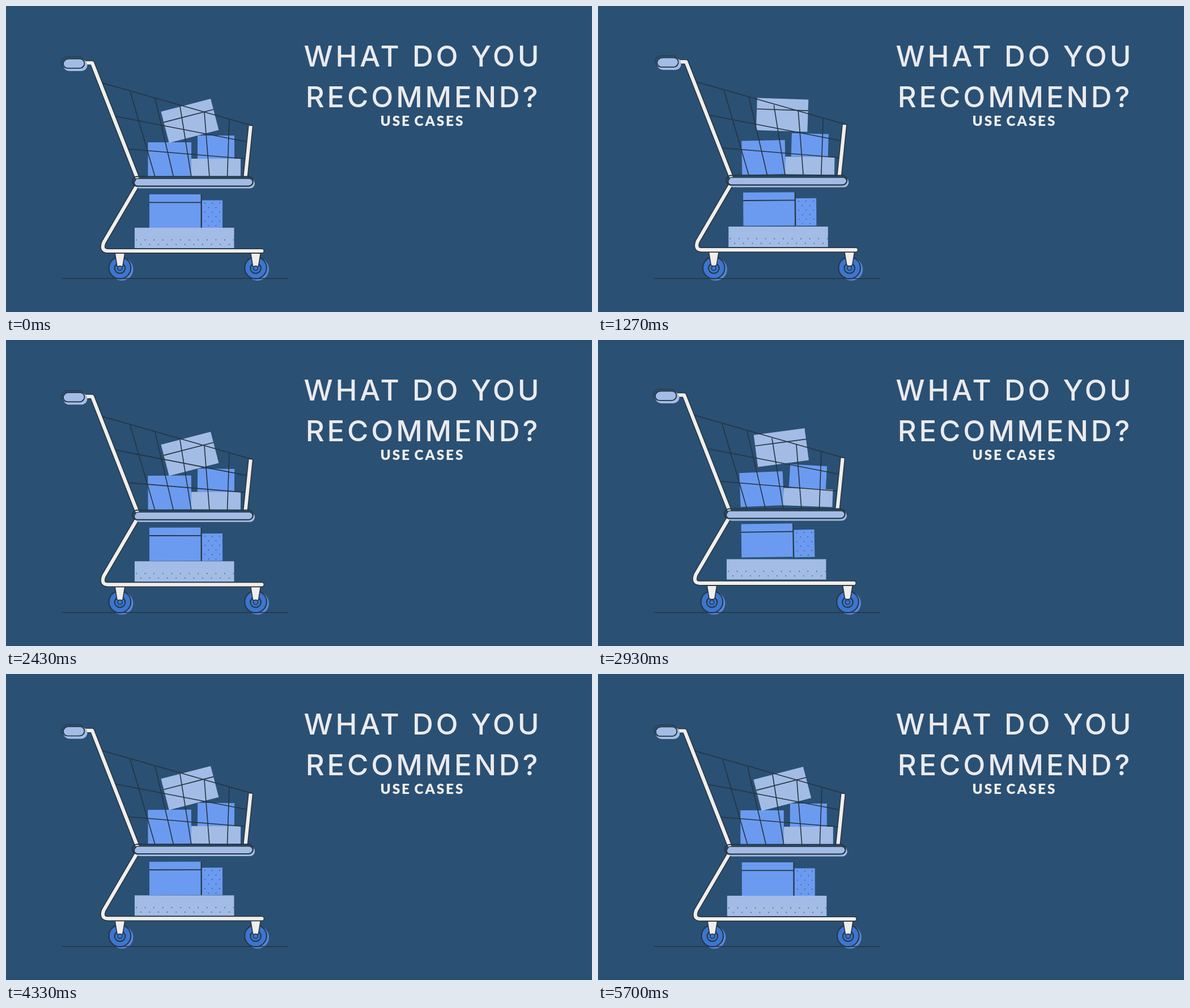
Write an HTML page with a canvas that moves like this. It is 1034 px wide and 541 px high and loops after 5.73 s.

```html
<!DOCTYPE html>
<html lang="en">
<head>
<meta charset="utf-8">
<title>What do you recommend?</title>
<style>
html, body { margin: 0; width: 100%; height: 100%; overflow: hidden; background: #2a5074; }
canvas { display: block; width: 1034px; height: 541px; }
</style>
</head>
<body>
<canvas id="stage" width="1034" height="541"></canvas>
<script>
const ctx = document.getElementById('stage').getContext('2d');
const LOOP = 5730, CYCLE = LOOP / 3;
const BG = '#2a5074', DARK = '#26343f', WHITE = '#f0eeec';
const LIGHT = '#a2bce5', BLUE = '#6b9bf0', WHEEL = '#3b76d0', DOT = '#35568c';

// Half sine between two times, zero elsewhere
const arc = (t, a, b) => t <= a || t >= b ? 0 : Math.sin(Math.PI * (t - a) / (b - a));
const ease = (t, a, b) => {
  const u = Math.min(1, Math.max(0, (t - a) / (b - a)));
  return (1 - Math.cos(Math.PI * u)) / 2;
};

function line(points, color = DARK, width = 1.6) {
  ctx.beginPath();
  points.forEach(([x, y]) => ctx.lineTo(x, y));
  ctx.strokeStyle = color;
  ctx.lineWidth = width;
  ctx.stroke();
}

function tube(path, cap = 'round') {
  ctx.lineCap = cap;
  ctx.lineJoin = 'round';
  for (const [color, width] of [[DARK, 9.2], [WHITE, 6.2]]) {
    ctx.strokeStyle = color;
    ctx.lineWidth = width;
    ctx.stroke(path);
  }
  ctx.lineCap = 'butt';
}

function pill(x, y, w, h, fill, stroke, width) {
  ctx.beginPath();
  ctx.roundRect(x, y, w, h, h / 2);
  if (fill) { ctx.fillStyle = fill; ctx.fill(); }
  if (stroke) { ctx.strokeStyle = stroke; ctx.lineWidth = width; ctx.stroke(); }
}

function disc(x, y, r, fill, width) {
  ctx.beginPath();
  ctx.arc(x, y, r, 0, Math.PI * 2);
  ctx.fillStyle = fill;
  ctx.fill();
  if (width) { ctx.strokeStyle = DARK; ctx.lineWidth = width; ctx.stroke(); }
}

// Box with its own lift and tilt; decor draws in coordinates from its top left corner
function box(x, y, w, h, color, lift, deg, decor) {
  ctx.save();
  ctx.translate(x + w / 2, y + h / 2 - lift);
  ctx.rotate(deg * Math.PI / 180);
  ctx.translate(-w / 2, -h / 2);
  ctx.fillStyle = color;
  ctx.fillRect(0, 0, w, h);
  if (decor) decor(w, h);
  ctx.restore();
}

function dots(x0, y0, dx, dy, cols, rows) {
  ctx.fillStyle = DOT;
  for (let r = 0; r < rows; r++)
    for (let c = 0; c < cols - r % 2; c++)
      ctx.fillRect(x0 + (c + r % 2 / 2) * dx - 0.8, y0 + r * dy - 0.8, 1.6, 1.6);
}

function boxes(t) {
  const hop = arc(t, 470, 1400);
  const toss = arc(t, 470, 1620);
  const spin = ease(t, 800, 1290) * (1 - ease(t, 1290, 1590));

  box(227, 392, 175.5, 36, LIGHT, hop * 4.7, 0, () => dots(3, 21.5, 15.6, 8, 12, 2));
  box(346, 343.5, 36, 48.5, BLUE, hop * 8.4, hop * -1.2, () => dots(5, 5, 13, 8, 3, 6));
  box(253, 333, 91.5, 59, BLUE, hop * 8.4, hop * -0.8, (w, h) => {
    line([[0, 14.3], [w, 14.3]], DARK, 1.8);
    line([[w, 0], [w, h]], DARK, 1.8);
  });
  box(338, 229, 65, 41.5, BLUE, hop * 8, hop * 3.5);
  box(250.5, 241, 76.5, 60, BLUE, hop * 7.7, hop * -2.4);
  box(327, 270, 87, 31, LIGHT, hop * 7.4, hop * 2.1);
  box(279.2 - spin * 2.6, 174.5, 90.5, 57, LIGHT, toss * 12.8, -14.5 + spin * 16.5,
    w => line([[0, 19.5], [w, 19.5]], DARK, 1.7));
}

function wires() {
  line([[170, 136], [436, 212]]);
  line([[193, 195], [427, 240.5]]);
  line([[217, 253], [421, 270]]);
  [[219, 151, 263], [263, 163.5, 295.5], [307, 177, 327], [350, 188, 359], [394, 200, 390.5]]
    .forEach(([x, y, foot]) => line([[x, y], [foot, 302]]));
}

const handlePost = new Path2D('M138 100.5 H152 L231.5 304');
const base = new Path2D('M232 316 L172.5 418 Q167 433 180 433 H451.5');
const frontPost = new Path2D('M431.7 212 L422.5 302');

function frame() {
  tube(handlePost);
  tube(base);
  tube(frontPost, 'butt');
  pill(101, 94, 42.5, 21, LIGHT);
  pill(97.5, 90, 41, 20, null, DARK, 1);
  pill(101, 93.5, 37.5, 16.5, null, DARK, 1.6);
  pill(227, 305, 212, 17.5, LIGHT);
  pill(223, 301.5, 213, 17, null, DARK, 2);
  pill(226, 305, 209.5, 13.5, null, DARK, 1.4);
}

function wheel(x) {
  disc(x + 3.5, 465.5, 20, '#5788d8');
  disc(x, 463, 19.3, WHEEL, 2);
  disc(x, 463.5, 9.3, WHEEL, 2);
}

function fork(x, lift) {
  ctx.beginPath();
  ctx.moveTo(x - 8.8, 437 - lift);
  ctx.lineTo(x + 8.8, 437 - lift);
  ctx.lineTo(x + 5, 460 - lift);
  ctx.quadraticCurveTo(x, 463.5 - lift, x - 5, 460 - lift);
  ctx.closePath();
  ctx.fillStyle = WHITE;
  ctx.fill();
  ctx.strokeStyle = DARK;
  ctx.lineWidth = 1.6;
  ctx.stroke();
  disc(x, 463.5, 4, WHEEL, 1.6);
}

function label(text, x, y, font, spacing, color, wordSpacing = 0) {
  ctx.font = font;
  ctx.letterSpacing = spacing + 'px';
  ctx.wordSpacing = wordSpacing + 'px';
  ctx.textAlign = 'center';
  ctx.fillStyle = color;
  ctx.fillText(text, x + spacing / 2, y);
}

function draw(now) {
  const t = now % LOOP % CYCLE;
  const sway = Math.min(3.3, 5 * arc(t, 1020, 1930));
  const lift = 3.1 * arc(t, 450, 1500);

  ctx.fillStyle = BG;
  ctx.fillRect(0, 0, 1034, 541);

  const title = '500 51px Inter, "Open Sans", sans-serif';
  label('WHAT DO YOU', 733, 107, title, 4.7, '#ebeaed');
  label('RECOMMEND?', 733.5, 178.5, title, 4.8, '#ebeaed');
  label('USE CASES', 733.5, 211.5, '900 24.4px Lato, "Open Sans", sans-serif', 2.9, '#f1efee', -3);

  ctx.save();
  ctx.translate(sway, 0);
  [201, 440.5].forEach(wheel);
  [201, 440.5].forEach(x => fork(x, lift));
  boxes(t);
  ctx.translate(0, -lift);
  wires();
  frame();
  ctx.restore();

  line([[99, 481.7], [497.5, 481.7]], DARK, 1.5);
}

let start;
function tick(now) {
  start ??= now;
  draw(now - start);
  requestAnimationFrame(tick);
}
requestAnimationFrame(tick);
</script>
</body>
</html>
```
